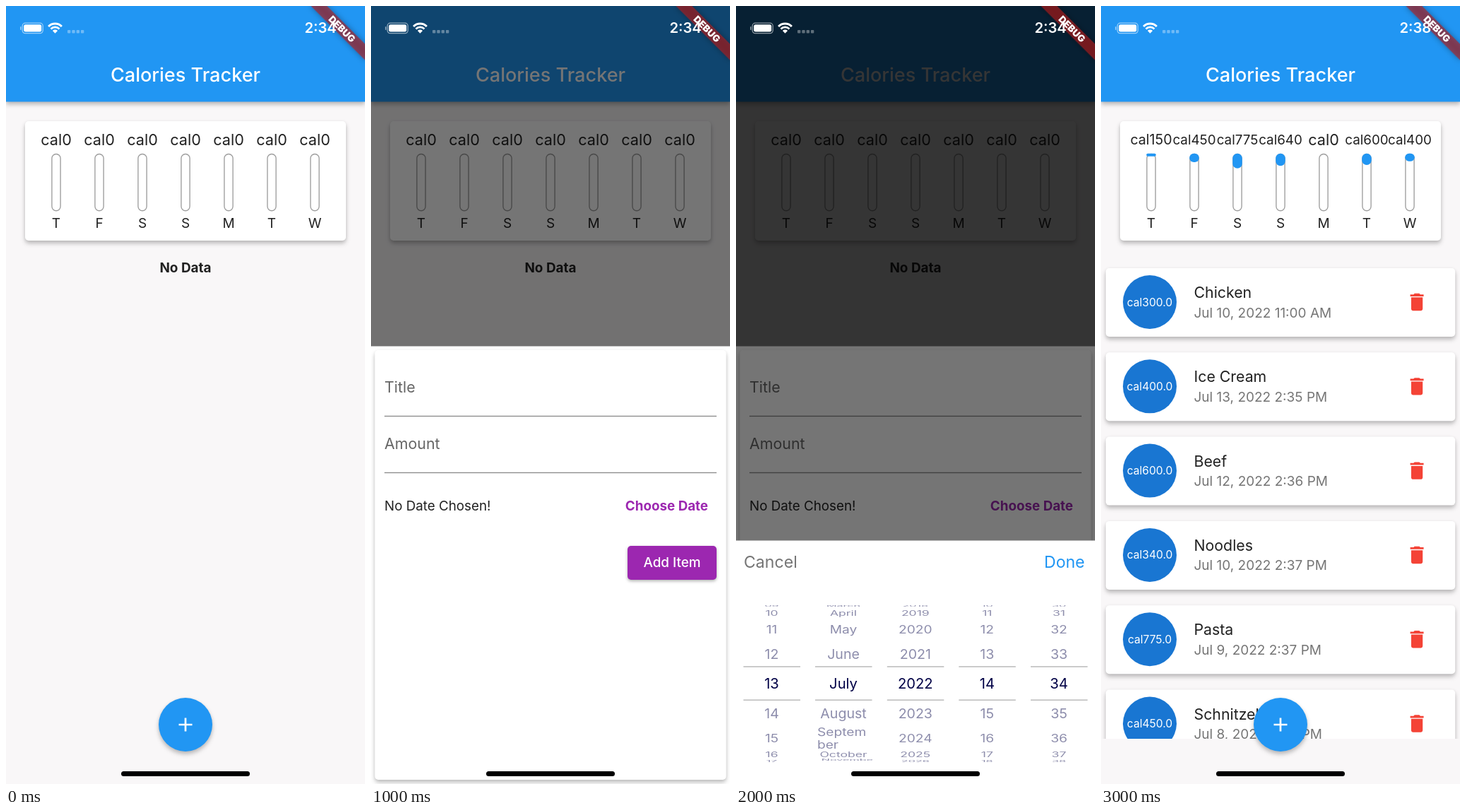
Animation of 508 by 1101 pixels, one loop 4000 ms. Source, as an HTML page:

```html
<!DOCTYPE html>
<html lang="en">
<head>
<meta charset="utf-8">
<title>Calories Tracker</title>
<style>
  html, body { margin: 0; width: 100%; height: 100%; overflow: hidden; background: #f9f7f8; }
  svg { display: block; width: 508px; height: 1101px; font-family: Inter, "Liberation Sans", sans-serif; }
  .raised { filter: drop-shadow(0 4px 3px rgba(0,0,0,.22)) drop-shadow(0 1px 2px rgba(0,0,0,.08)); }
  .low { filter: drop-shadow(0 2px 2px rgba(0,0,0,.3)); }
</style>
</head>
<body>
<svg id="stage" viewBox="0 0 508 1101">
  <defs>
    <clipPath id="listClip"><rect y="345" width="508" height="692"/></clipPath>
    <clipPath id="wheelClip"><rect y="848" width="508" height="222"/></clipPath>
    <path id="bin" transform="scale(1.3547)" fill="#f44336"
      d="M6 19c0 1.1.9 2 2 2h8c1.1 0 2-.9 2-2V7H6v12zM19 4h-3.5l-1-1h-5l-1 1H5v2h14V4z"/>
  </defs>
  <g id="scene"></g>
  <g transform="translate(508) rotate(45)">
    <rect x="-54.2" y="37.9" width="108.4" height="16.3" fill="#b71c1c" fill-opacity=".627"
      style="filter: drop-shadow(0 0 4px rgba(0,0,0,.5))"/>
    <text y="50.8" font-size="13.4" font-weight="900" fill="#fff" text-anchor="middle">DEBUG</text>
  </g>
  <g fill="#fff">
    <rect x="20" y="29" width="1.6" height="5" rx=".8" opacity=".5"/>
    <rect x="23.2" y="24.2" width="29" height="14.4" rx="4" fill="none" stroke="#fff" stroke-opacity=".55" stroke-width="1.3"/>
    <rect x="25.2" y="26.2" width="25" height="10.4" rx="2.4"/>
    <g fill="none" stroke="#fff">
      <path d="M60.1 29a13.3 13.3 0 0 1 18.8 0" stroke-width="3"/>
      <path d="M63.5 32.4a8.5 8.5 0 0 1 12 0" stroke-width="2.8"/>
    </g>
    <path d="M69.5 38.8l-3.6-3.7a5.1 5.1 0 0 1 7.2 0z"/>
    <g opacity=".35">
      <rect x="87" y="34" width="4.4" height="4.4" rx="1"/>
      <rect x="93.3" y="34" width="4.4" height="4.4" rx="1"/>
      <rect x="99.6" y="34" width="4.4" height="4.4" rx="1"/>
      <rect x="105.9" y="34" width="4.4" height="4.4" rx="1"/>
    </g>
    <text id="clock" x="422.5" y="38.3" font-size="20.2" font-weight="600"></text>
  </g>
  <rect x="163" y="1083" width="182" height="7" rx="3.5"/>
</svg>
<script>
const BLUE = '#2196f3', PURPLE = '#9c27b0', INK = '#212121', GREY = '#757575';
const DAYS = 'TFSSMTW';
const EATEN = [150, 450, 775, 640, 0, 600, 400];
const MEALS = [
  [300, 'Chicken', 'Jul 10, 2022 11:00 AM'],
  [400, 'Ice Cream', 'Jul 13, 2022 2:35 PM'],
  [600, 'Beef', 'Jul 12, 2022 2:36 PM'],
  [340, 'Noodles', 'Jul 10, 2022 2:37 PM'],
  [775, 'Pasta', 'Jul 9, 2022 2:37 PM'],
  [450, 'Schnitzel', 'Jul 8, 2022 2:38 PM']
];
const MONTHS = ['March', 'April', 'May', 'June', 'July', 'August', 'September', 'October', 'November'];
// Wheel rows by distance from the middle: offset, x scale, y scale
const WHEEL = [[0, 1, 1], [42, .97, .94], [77, .95, .76], [100, .87, .48], [110, .8, .14]];

const text = (s, x, y, size, fill = INK, anchor = 'start', weight = 400) =>
  `<text x="${x}" y="${y}" font-size="${size}" fill="${fill}" text-anchor="${anchor}" font-weight="${weight}">${s}</text>`;
const rect = (x, y, w, h, fill, more = '') =>
  `<rect x="${x}" y="${y}" width="${w}" height="${h}" fill="${fill}" ${more}/>`;
const card = (x, y, w, h) => rect(x, y, w, h, '#fff', 'rx="5" class="raised"');
const scrim = rect(0, 0, 508, 1101, '#000', 'opacity=".54"');

function bar(cal, i) {
  const x = 71 + 61 * i, h = cal / 3000 * 81.3;
  const size = cal === 0 ? 21.6 : cal === 150 ? 19.6 : 18.8;
  return text('cal' + cal, x, cal ? 196 : 197, size, INK, 'middle')
    + rect(x - 6.1, 209.5, 12.2, 80.2, 'none', 'rx="6.1" stroke="#9e9e9e" stroke-width="1.35"')
    + (h ? rect(x - 6.8, 208.8, 13.6, h, BLUE, `rx="${Math.min(6.8, h / 2)}"`) : '')
    + text(DAYS[i], x, 313.5, 19, INK, 'middle');
}

const home = cals => rect(0, 0, 508, 1101, '#f9f7f8')
  + rect(0, 0, 508, 135.5, BLUE, 'class="raised"')
  + text('Calories Tracker', 254, 107, 27.1, '#fff', 'middle', 500)
  + card(27, 163, 454, 169)
  + cals.map(bar).join('');

const addButton = `<circle cx="254" cy="1017" r="38" fill="${BLUE}" class="raised"/>`
  + '<path d="M244.5 1017h19M254 1007.5v19" stroke="#fff" stroke-width="2.7"/>';

const empty = home(EATEN.map(() => 0)) + text('No Data', 254, 377, 18.9, INK, 'middle', 700);

const form = empty + scrim
  + rect(0, 481.5, 508, 620, '#fff')
  + card(5.4, 487, 497.2, 608)
  + text('Title', 19, 547, 21.4, '#666')
  + rect(19, 579.8, 470, 1.35, '#8c8c8c')
  + text('Amount', 19, 627, 21.4, '#666')
  + rect(19, 659.8, 470, 1.35, '#8c8c8c')
  + text('No Date Chosen!', 19, 714, 18.8, INK)
  + text('Choose Date', 477, 714, 18.8, PURPLE, 'end', 700)
  + rect(363, 764, 126, 48, PURPLE, 'rx="5" class="low"')
  + text('Add Item', 426, 794, 18.9, '#fff', 'middle', 500);

function wheel(x, label) {
  let out = rect(x - 40, 934.3, 80.5, 1.35, '#b3b3b3') + rect(x - 40, 981.5, 80.5, 1.35, '#b3b3b3');
  for (let k = -4; k <= 4; k++) {
    const [dy, sx, sy] = WHEEL[Math.abs(k)];
    const s = label(k);
    const lines = s.length > 8 ? [s.slice(0, 6), s.slice(6)] : s === 'November' ? ['Novembe', 'r'] : [s];
    const body = lines.length === 1 ? text(s, 0, 7.3, 20.2, '#000046', 'middle')
      : lines.map((part, n) => text(part, -39, n ? 20 : -4, 20.2, '#000046')).join('');
    out += `<g transform="translate(${x} ${959 + Math.sign(k) * dy}) scale(${sx} ${sy})" opacity="${k ? .447 : 1}">${body}</g>`;
  }
  return out;
}

const two = n => String(n).padStart(2, '0');
const picker = form + scrim
  + rect(0, 756.5, 508, 345, '#fff')
  + text('Cancel', 11, 794.5, 23.1, GREY)
  + text('Done', 493.5, 794.5, 23, BLUE, 'end')
  + '<g clip-path="url(#wheelClip)">'
  + wheel(50.5, k => two(13 + k))
  + wheel(152, k => MONTHS[4 + k])
  + wheel(253.8, k => String(2022 + k))
  + wheel(355.3, k => two(14 + k))
  + wheel(457, k => two(34 + k)) + '</g>';

const meal = ([cal, name, when], i) => `<g transform="translate(0 ${371 + 119.3 * i})">`
  + card(6.8, 0, 494.4, 97)
  + '<circle cx="69" cy="48" r="38" fill="#1976d2"/>'
  + text(`cal${cal}.0`, 69, 53.5, 15.6, '#fff', 'middle')
  + text(name, 131.5, 42, 21.3)
  + text(when, 131.5, 69.5, 19, GREY)
  + '<use href="#bin" x="0" y="0" transform="translate(430.8 31.8)"/></g>';

const list = home(EATEN) + `<g clip-path="url(#listClip)">${MEALS.map(meal).join('')}</g>` + addButton;

const scenes = [empty + addButton, form, picker, list];
const scene = document.getElementById('scene'), clock = document.getElementById('clock');
let shown = -1;

function draw() {
  const now = Math.floor(performance.now() / 1000) % scenes.length;
  if (now !== shown) {
    shown = now;
    scene.innerHTML = scenes[now];
    clock.textContent = now === 3 ? '2:38' : '2:34';
  }
  requestAnimationFrame(draw);
}
draw();
</script>
</body>
</html>
```
